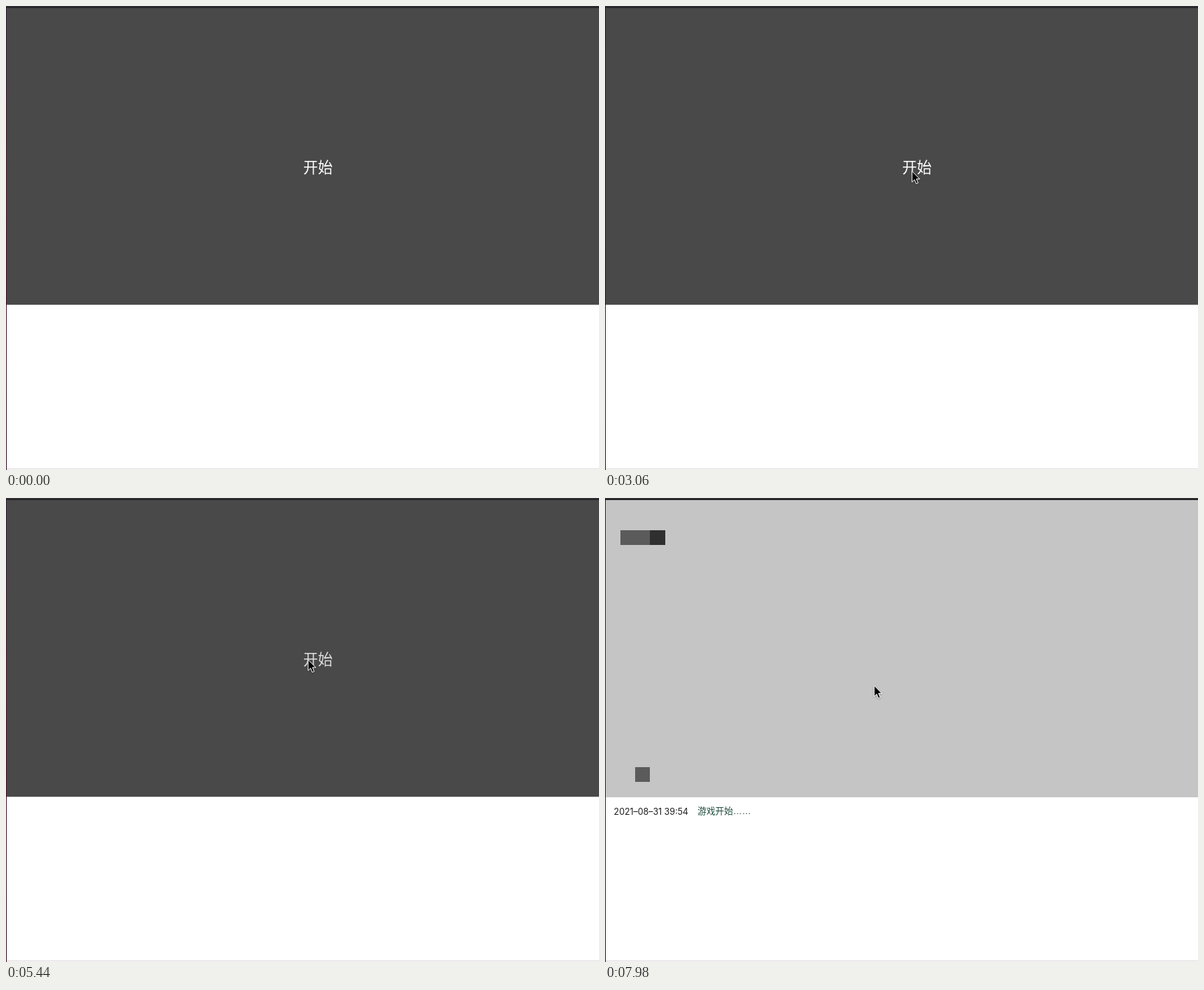
Write an HTML page that moves like this. It is 846x662 px and loops after 8000 ms.

```html
<!DOCTYPE html>
<html lang="zh-CN">
<head>
<meta charset="utf-8">
<style>
  html, body { margin: 0; width: 100%; height: 100%; overflow: hidden; background: #fff; }
  svg { display: block; width: 846px; height: 662px; }
  text { font: 500 12.7px "Noto Sans CJK SC", "Noto Sans CJK", sans-serif; }
  #start { font-size: 21.1px; }
  #stamp { font: 400 12.4px Inter, sans-serif; fill: #1c1c1c; }
  .dots { font-family: "Liberation Sans", sans-serif; }
</style>
</head>
<body>
<svg viewBox="0 0 846 662">
  <defs>
    <linearGradient id="edge" x2="0" y2="1">
      <stop offset="0" stop-color="#2c2036"/>
      <stop offset=".4" stop-color="#4a1c2e"/>
      <stop offset="1" stop-color="#2e0d1c"/>
    </linearGradient>
    <filter id="shadow" x="-50%" y="-50%" width="200%" height="200%">
      <feDropShadow dx="0" dy="1" stdDeviation=".8" flood-opacity=".35"/>
    </filter>
  </defs>

  <g id="menu">
    <rect y="3" width="846" height="423.3" fill="#494949"/>
    <text id="start" x="424" y="237.7">开始</text>
  </g>

  <g id="game">
    <rect y="3" width="846" height="424" fill="#c5c5c5"/>
    <!-- Board cells -->
    <g transform="translate(1 3.2) scale(21.15)" shape-rendering="crispEdges">
      <rect x="1" y="2" width="2" height="1" fill="#5b5b5b"/>
      <rect x="3" y="2" width="1" height="1" fill="#2f2f2f"/>
      <rect x="2" y="18" width="1" height="1" fill="#5b5b5b"/>
    </g>
    <text id="stamp" x="12.6" y="451.6">2021–08–31 39:54</text>
    <text x="132" y="451.4" fill="#1d4a3c">游戏开始<tspan class="dots">……</tspan></text>
  </g>

  <rect width="846" height="3" fill="#2e2c30"/>
  <rect y="2" width="846" height="1" fill="#222"/>
  <rect width="1" height="662" fill="url(#edge)"/>
  <rect x="1" y="660" width="845" height="1" fill="#d8d3d6"/>

  <g id="cursor">
    <path id="arrow" filter="url(#shadow)" fill="#000" stroke="#fff" stroke-width="1"
      d="M0 .6V16.2L3.6 12.8 6 18.6 8.6 17.5 6.3 11.8H11Z"/>
    <g id="hand" filter="url(#shadow)" stroke="#000" stroke-width=".9" stroke-linejoin="round">
      <path fill="#fff" d="M-1.2 9.4L-2.2 2.2Q-2 .6-.6.6 .7.6 1 2L1.7 6.2Q3.5 5.3 4.3 6.7 6 6 6.8 7.5 8.9 7 9.2 9 9.4 11.5 8 14L7.8 17H-.2Q-.6 15-2.6 12.8L-4.6 9.8Q-5 8.3-3.6 8.1-2.4 8.2-1.2 9.4Z"/>
      <path fill="none" d="M1.9 11.2V14.6M3.9 11.2V14.6M5.9 11.2V14.6"/>
    </g>
  </g>
</svg>
<script>
  const LOOP = 8000, ENTER = 720, HOVER = 3340, CLICK = 5440, PLAY = 5460;
  const ENTRY = { x: 824, y: 587 };

  // The pointer rests between moves.
  const moves = [
    { from: ENTER, to: 1240, x: 362, y: 194 },
    { from: 1840, to: 2380, x: 432, y: 251 },
    { from: 2500, to: 3060, x: 438, y: 235 },
    { from: 3520, to: 3800, x: 435, y: 233 },
    { from: 3900, to: 4060, x: 428, y: 232 },
    { from: 4460, to: 4480, x: 431, y: 230 },
    { from: 6280, to: 6880, x: 399, y: 259 },
    { from: 6980, to: 7160, x: 382, y: 268 },
    { from: 7860, to: 7980, x: 384, y: 267 }
  ];

  const el = id => document.getElementById(id);
  const smooth = p => p * p * (3 - 2 * p);
  const show = (id, on) => el(id).setAttribute("visibility", on ? "visible" : "hidden");

  function pointerAt(t) {
    let { x, y } = ENTRY;
    for (const move of moves) {
      if (t < move.from) break;
      const p = smooth(Math.min(1, (t - move.from) / (move.to - move.from)));
      x += (move.x - x) * p;
      y += (move.y - y) * p;
    }
    return `translate(${x} ${y})`;
  }

  function draw(now) {
    const t = now % LOOP;
    const hand = t >= HOVER && t < CLICK;
    show("menu", t < PLAY);
    show("game", t >= PLAY);
    show("arrow", t >= ENTER && !hand);
    show("hand", hand);
    el("start").setAttribute("fill", t < HOVER ? "#fff" : "#dedede");
    el("cursor").setAttribute("transform", pointerAt(t));
  }

  const began = performance.now();
  function tick() {
    draw(performance.now() - began);
    requestAnimationFrame(tick);
  }
  tick();
</script>
</body>
</html>
```
